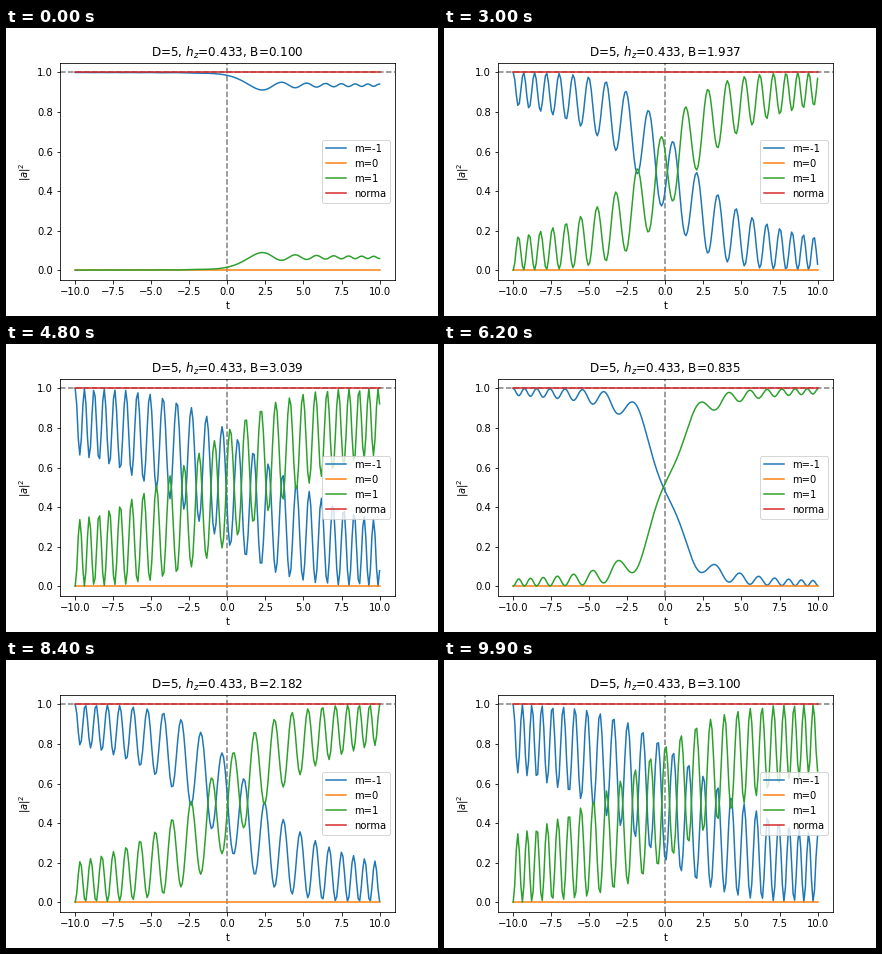
Animation of 432 by 288 pixels, one loop 10 s. Source, as a matplotlib script:

```python
import numpy as np
import matplotlib.pyplot as plt
from matplotlib.animation import FuncAnimation

D, HZ = 5, 0.433
FIELDS = np.linspace(0.1, 3.1, 50)
TIMES = np.linspace(-10, 10, 200)
SUBSTEPS = 24


def evolve(b):
    """Populations of m=-1 and m=+1 for H = hz*t*Sz + B*(Sx^2 - Sy^2)."""
    lo = np.ones_like(b, dtype=complex)
    hi = np.zeros_like(lo)
    dt = (TIMES[1] - TIMES[0]) / SUBSTEPS
    pops = [(abs(lo) ** 2, abs(hi) ** 2)]
    for start in TIMES[:-1]:
        for k in range(SUBSTEPS):
            z = HZ * (start + (k + 0.5) * dt)
            e = np.hypot(z, b)
            c, s = np.cos(e * dt), -1j * np.sin(e * dt) / e
            lo, hi = (c - s * z) * lo + s * b * hi, s * b * lo + (c + s * z) * hi
        pops.append((abs(lo) ** 2, abs(hi) ** 2))
    return np.array(pops).transpose(1, 2, 0)


LOW, HIGH = evolve(FIELDS)
ZERO = np.zeros_like(TIMES)

plt.rcParams["font.family"] = "DejaVu Sans"
fig, ax = plt.subplots(figsize=(6, 4), dpi=72)
fig.subplots_adjust(left=0.125, right=0.9, bottom=0.125, top=0.88)

ax.axhline(1, color="gray", ls="--")
ax.axvline(0, color="gray", ls="--")
labels = ["m=-1", "m=0", "m=1", "norma"]
lines = [ax.plot(TIMES, ZERO, color=f"C{i}", label=name)[0]
         for i, name in enumerate(labels)]
ax.set(xlim=(-11, 11), ylim=(-0.05, 1.05), xlabel="t", ylabel="$|a|^2$")
ax.set_xticks(np.arange(-10, 10.1, 2.5))
ax.legend(loc="center right")
title = ax.set_title("")


def update(i):
    n = i % len(FIELDS)
    curves = LOW[n], ZERO, HIGH[n], LOW[n] + HIGH[n]
    for line, y in zip(lines, curves):
        line.set_ydata(y)
    title.set_text(f"D={D}, $h_z$={HZ:.3f}, B={FIELDS[n]:.3f}")
    return [*lines, title]


anim = FuncAnimation(fig, update, frames=2 * len(FIELDS), interval=100,
                     repeat=True, repeat_delay=0, blit=False)
plt.show()
```
